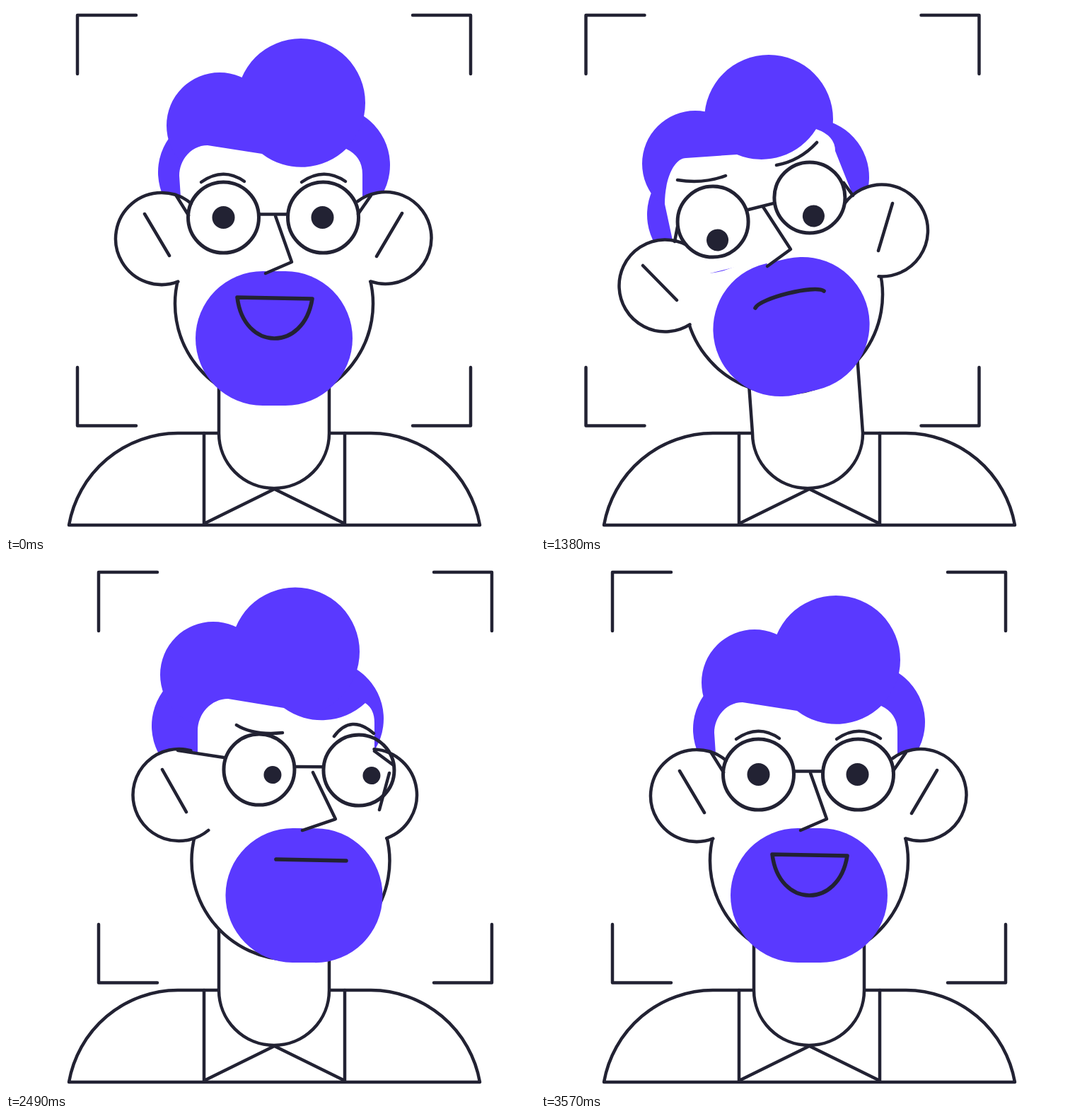
Animation, 748 px wide and 748 px high, one loop 3750 ms. Source, as an HTML page:

```html
<!DOCTYPE html>
<html lang="en">
<head>
<meta charset="utf-8">
<title>Face scan</title>
<style>
  html, body { margin: 0; width: 100%; height: 100%; overflow: hidden; background: #fff; }
  svg { display: block; width: 100%; height: 100%; }
  path { fill: none; stroke: #222233; stroke-width: 4.5; stroke-linecap: round; stroke-linejoin: round; }
  .white { fill: #fff; }
  .skin { fill: #fff; stroke: none; }
  .fur { fill: #5a39ff; stroke: none; }
  .furline { stroke: #5a39ff; }
  #back { stroke-width: 166; }
  #beard { stroke-width: 190; }
  #lenses { stroke-width: 5; }
  #mouth { stroke-width: 5.6; }
</style>
</head>
<body>
<svg viewBox="0 0 748 748">
  <path d="M89 734A157 157 0 0 1 243 604H516A157 157 0 0 1 670 734Z"/>
  <path d="M280 604V732L379.500 683L479 732V604"/>
  <path id="neck" class="white"/>
  <path id="face" class="skin"/>
  <path id="jaw"/>
  <path id="back" class="furline"/>
  <path id="curls" class="fur"/>
  <path id="forehead" class="skin"/>
  <path id="discs" class="skin"/>
  <path id="ears"/>
  <path id="folds"/>
  <path id="beard" class="furline"/>
  <path id="temples"/>
  <path id="lenses"/>
  <path id="bridge"/>
  <path id="nose" class="white"/>
  <path id="eyes"/>
  <path id="brows"/>
  <path id="mouth"/>
  <path id="frame" d="M184 13H101V96M575 13H657V96M101 511V593.500H184M657 511V593.500H575"/>
</svg>
<script>
// Points are x, y pairs; keys in SCALARS hold angles and sizes instead.
// turn: neck lean, glasses tilt, beard tilt, beard half length
// arcs: ear outline ends in degrees; curl: upper and lower lip bulge
const SCALARS = ['turn', 'arcs', 'pupil', 'curl'];

const front = {
  turn: [0, 0, 0, 16], arcs: [-50, 69, -53, 71], pupil: [32, 32], curl: [0, 76],
  frame: [0, 0], jaw: [379, 421], ears: [220, 329, 536.5, 328],
  folds: [196, 294, 231, 353, 560, 293, 524, 354],
  temples: [240, 267, 258, 296, 516, 268, 498, 294],
  glasses: [378, 299], eyes: [377.5, 299], nose: [381, 297, 404, 362, 367, 378],
  brows: [276, 249, 307, 227, 337, 248, 418, 249, 449, 227, 480, 248],
  beard: [379, 470], mouth: [327, 412, 433, 414],
  hair: [302, 169, 417, 137, 298, 235, 460, 225],
  rim: [247, 270, 245, 240, 285, 197, 362, 209, 481, 202, 504, 238, 504, 270]
};
const leftDip = {
  turn: [0, -5.6, -5.5, 12.5], arcs: [-84, 90, -62, 70], pupil: [35, 23], curl: [0, 65],
  frame: [-21.5, 22], jaw: [354, 439], ears: [216.5, 359, 494, 332],
  folds: [195, 329, 215, 378, 519, 298, 482, 360],
  temples: [217, 296, 210, 322, 493, 268, 450, 305],
  glasses: [329.5, 325], eyes: [323.5, 319.5], nose: [319, 319, 303, 386, 329, 398],
  brows: [227, 273, 258, 255, 276, 264, 358, 257, 374, 245, 423, 258],
  beard: [345.5, 488.5], mouth: [290, 440, 372, 434],
  hair: [280, 200, 397, 160, 279, 262, 438, 231],
  rim: [222, 295, 217, 265, 250, 227, 313, 232, 434, 214, 467, 246, 470, 275]
};
const right = {
  turn: [0, .4, .3, 16], arcs: [-75, 50, -94, 110], pupil: [25, 25], curl: [0, 0],
  frame: [30, 0], jaw: [402.5, 421], ears: [244.5, 328, 516, 328],
  folds: [221, 292, 255, 352, 542, 297, 528, 349],
  temples: [243, 265, 308, 275, 521, 266, 548, 286],
  glasses: [428.5, 292.5], eyes: [447, 300], nose: [434, 296, 466, 362, 419, 378],
  brows: [326, 229, 350, 244, 391, 240, 464, 245, 488, 213, 520, 241],
  beard: [421.5, 470], mouth: [382, 419, 481, 421],
  hair: [293, 169.5, 409, 137, 289, 236, 451, 226],
  rim: [271, 270, 271, 238, 314, 192, 393, 205, 508, 198, 521, 226, 521, 266]
};
const rightDip = {
  turn: [-4, 2.5, 3, 16], arcs: [-53, 68, -68, 84], pupil: [44, 16], curl: [0, 0],
  frame: [12, 29], jaw: [390, 436], ears: [233, 358.5, 533, 371],
  folds: [211, 322, 242, 382, 559, 339, 528, 395],
  temples: [250, 285, 282, 321, 525, 295, 522, 331],
  glasses: [402.5, 330], eyes: [424, 324.5], nose: [407, 308, 430, 374, 389, 388],
  brows: [306, 237, 331, 254, 371, 251, 445, 258, 470, 246, 504, 252],
  beard: [393.5, 481], mouth: [355, 437, 455, 442],
  hair: [309, 218.5, 425, 193, 304, 273, 462, 275],
  rim: [264, 296, 263, 272, 308, 215, 385, 230, 502, 228, 518, 266, 519, 305]
};
const tilted = {
  turn: [-11, -14, -13, 16], arcs: [-63, 57.5, -36, 86], pupil: [31, 31], curl: [-12, -12],
  frame: [-37.5, 0], jaw: [343, 408], ears: [175.5, 395.5, 482, 317.5],
  folds: [144, 367, 192, 416, 497, 279, 477, 346],
  temples: [193, 312, 189, 333, 428, 250, 441, 268],
  glasses: [311.5, 288], eyes: [317.5, 314], nose: [314, 284, 353, 344, 320, 368],
  brows: [193, 246, 229, 252, 261, 240, 333, 225, 366, 219, 390, 193],
  beard: [354, 453.5], mouth: [303, 427, 400, 403],
  hair: [218, 223, 322, 160, 233, 295, 381, 242],
  rim: [186, 331, 175, 280, 205, 215, 277, 210, 389, 174, 416, 205, 441, 268]
};

const mapPose = (pose, fn) => Object.fromEntries(
  Object.entries(pose).map(([k, list]) => [k, list.map((v, i) => fn(v, k, i))]));
const mix = (a, b, f) => mapPose(a, (v, k, i) => v + (b[k][i] - v) * f);
const shiftY = (pose, dy) => mapPose(pose, (v, k, i) =>
  !SCALARS.includes(k) && i % 2 ? v + dy : v);
const dipBetween = (a, b) => ({ ...shiftY(mix(a, b, .5), 25), pupil: [40, 18] });

const left = { ...mix(front, shiftY(leftDip, -18), 1.3), frame: [-31.5, 0], pupil: [31, 31] };

const SPAN = 212;
const ease = p => p < .5 ? 4 * p ** 3 : 1 - 4 * (1 - p) ** 3;
const move = (start, from, mid, to, midTime = start + SPAN / 2) =>
  ({ start, from, mid, to, k: ease((midTime - start) / SPAN) });
const moves = [
  move(26, front, leftDip, left, 150),
  move(398, left, dipBetween(left, right), right),
  move(904, right, rightDip, tilted, 990),
  move(1406, tilted, dipBetween(tilted, front), front)
];

// Hair springs up as the head arrives, then sways back.
function bounce(s) {
  if (Math.abs(s) < 60) return -12 * Math.cos(Math.PI / 120 * s);
  return s > 60 && s < 240 ? 4 * Math.sin(Math.PI * (s - 60) / 180) : 0;
}

function poseAt(t) {
  const m = moves.filter(x => x.start <= t).pop();
  if (!m || t >= 1680) return front;
  const { from, mid, to, k, start } = m;
  const e = ease(Math.min(1, (t - start) / SPAN));
  const wa = (e - k) * (e - 1) / k, wm = e * (e - 1) / (k * (k - 1)), wb = e * (e - k) / (1 - k);
  const pose = mapPose(from, (v, key, i) => v * wa + mid[key][i] * wm + to[key][i] * wb);
  const lift = bounce(t - start - SPAN);
  [1, 1, .5, .5].forEach((f, i) => { pose.hair[2 * i + 1] += lift * f; });
  return pose;
}

const el = id => document.getElementById(id);
const draw = (id, d) => el(id).setAttribute('d', d);
const disc = (x, y, r) => `M${x - r} ${y}a${r} ${r} 0 1 1 ${2 * r} 0a${r} ${r} 0 1 1 ${-2 * r} 0Z`;
const line = (a, b, c, d) => `M${a} ${b}L${c} ${d}`;
const rad = a => a * Math.PI / 180;

// A segment from x1 to x2 along a tilted axis, at height y off it
function bar([cx, cy], tilt, x1, x2, y = 0) {
  const c = Math.cos(rad(tilt)), s = Math.sin(rad(tilt));
  const at = x => [cx + x * c - y * s, cy + x * s + y * c];
  return [...at(x1), ...at(x2)];
}

function earArc(x, y, from, to, side) {
  const at = a => `${x + side * 65 * Math.cos(rad(a))} ${y + 65 * Math.sin(rad(a))}`;
  return `M${at(from)}A65 65 0 ${to - from < 180 ? 1 : 0} ${side < 0 ? 1 : 0} ${at(to)}`;
}

function foreheadPath([ax, ay, bx, by, cx, cy, dx, dy, fx, fy, gx, gy, hx, hy]) {
  return `M${ax} ${ay + 60}V${ay}L${bx} ${by}` +
    `C${bx} ${by + (cy - by) * .55} ${cx + (bx - cx) * .55} ${cy} ${cx} ${cy}` +
    `L${dx} ${dy}A91 91 0 0 0 ${fx} ${fy}` +
    `Q${gx} ${fy + (gy - fy) * .3} ${gx} ${gy}L${hx} ${hy}V${hy + 60}Z`;
}

function mouthPath([lx, ly, rx, ry], [up, low]) {
  const w = rx - lx, h = ry - ly, len = Math.hypot(w, h);
  const at = (f, n) => `${lx + w * f - h / len * n} ${ly + h * f + w / len * n}`;
  return `M${lx} ${ly}C${at(.1, up)} ${at(.9, up)} ${rx} ${ry}C${at(.9, low)} ${at(.1, low)} ${lx} ${ly}Z`;
}

function render(p) {
  const [lean, tilt, beardTilt, half] = p.turn;
  const [jx, jy] = p.jaw, [lx, ly, rx, ry] = p.ears, foot = lean * .18;
  el('frame').setAttribute('transform', `translate(${p.frame})`);
  draw('neck', `M${301 + lean} 480L${301 + foot} 604A78 78 0 0 0 ${457 + foot} 604L${457 + lean} 480`);

  const jawX = 140 * Math.cos(rad(15)), jawY = jy - 140 * Math.sin(rad(15));
  draw('face', disc(jx, jy, 140));
  draw('jaw', `M${jx - jawX} ${jawY}A140 140 0 1 0 ${jx + jawX} ${jawY}`);

  const [ox, oy, tx, ty, ...back] = p.hair;
  draw('back', line(...back));
  draw('curls', disc(ox, oy, 75) + disc(tx, ty, 91));
  draw('forehead', foreheadPath(p.rim));

  draw('discs', disc(lx, ly, 65) + disc(rx, ry, 65));
  draw('ears', earArc(lx, ly, p.arcs[0], p.arcs[1], 1) + earArc(rx, ry, p.arcs[2], p.arcs[3], -1));
  for (const id of ['folds', 'temples'])
    draw(id, line(...p[id].slice(0, 4)) + line(...p[id].slice(4)));

  draw('beard', line(...bar(p.beard, beardTilt, -half, half)));
  const [ax, ay, bx, by] = bar(p.glasses, tilt, -70.5, 70.5);
  draw('lenses', disc(ax, ay, 50) + disc(bx, by, 50));
  draw('bridge', line(...bar(p.glasses, tilt, -20, 20.5, -4.5)));
  draw('nose', 'M' + p.nose.join(' '));

  const [w, h] = p.pupil, r = Math.max(.01, (w - h) / 2);
  el('eyes').style.strokeWidth = h;
  draw('eyes', [-70, 70].map(x => line(...bar(p.eyes, tilt, x - r, x + r))).join(''));
  draw('brows', [0, 6].map(i => {
    const b = p.brows.slice(i, i + 6);
    return `M${b[0]} ${b[1]}Q${b.slice(2).join(' ')}`;
  }).join(''));
  draw('mouth', mouthPath(p.mouth, p.curl));
}

const LOOP = 3750, CYCLE = 1890, STEP = 30;
const begin = performance.now();
function tick() {
  const t = (performance.now() - begin) % LOOP % CYCLE;
  render(poseAt(Math.floor(t / STEP) * STEP));
  requestAnimationFrame(tick);
}
tick();
</script>
</body>
</html>
```
